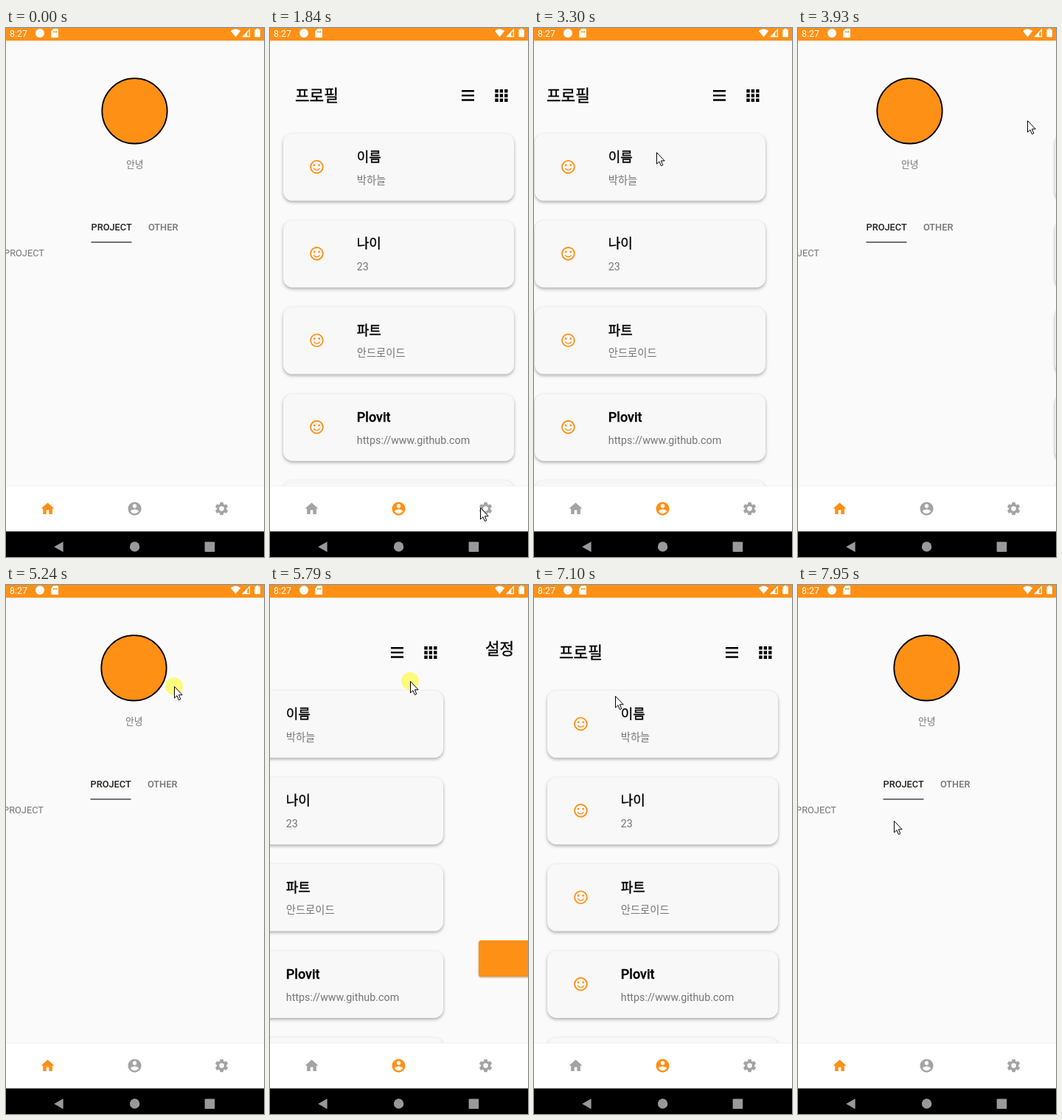
Recreate the animation shown at these times as an HTML page. Size 350 px wide and 716 px high, loop 8 s.

```html
<!DOCTYPE html>
<html lang="ko">
<head>
<meta charset="utf-8">
<style>
html, body { margin: 0; width: 100%; height: 100%; overflow: hidden; background: #fbfafa; }
svg { display: block; width: 350px; height: 716px; font-family: Roboto, "Noto Sans CJK KR", "Noto Sans CJK", sans-serif; }
.accent { fill: #ff9016; }
.soft { fill: #757575; }
.strong { font-weight: 500; stroke: #000; stroke-width: .35px; }
.head { font-size: 21.3px; }
.tab { font-size: 12.8px; font-weight: 500; }
.card { fill: #f8f8f8; filter: drop-shadow(0 2px 2.2px rgba(0,0,0,.32)); }
.button { filter: drop-shadow(0 1.5px 1.2px rgba(0,0,0,.3)); }
</style>
</head>
<body>
<svg viewBox="0 0 350 716">
  <rect width="350" height="716" fill="#fbfafa"/>

  <g class="page">
    <circle class="accent" cx="174.5" cy="112.3" r="44.2" stroke="#000" stroke-width="1.8"/>
    <text class="soft" x="174.8" y="189" font-size="12.8" text-anchor="middle">안녕</text>
    <text class="tab" x="115.5" y="274" fill="#212121">PROJECT</text>
    <text class="tab soft" x="193" y="274">OTHER</text>
    <rect x="115.5" y="289" width="55" height="1.8" fill="#62646c"/>
    <text class="soft" x="52" y="309.3" font-size="12.8" text-anchor="end">PROJECT</text>
  </g>

  <g class="page">
    <text class="strong head" x="34" y="99">프로필</text>
    <path d="M260 85.3h17M260 91.4h17M260 97.5h17" stroke="#000" stroke-width="2.4"/>
    <path d="M305.3 85.2h17.2M305.3 91.5h17.2M305.3 97.8h17.2" stroke="#000" stroke-width="4.4" stroke-dasharray="4.4 2"/>
    <g id="cards"></g>
  </g>

  <g class="page">
    <text class="strong head" x="34" y="94">설정</text>
    <rect class="accent button" x="25" y="481" width="299.5" height="49.3" rx="3.5"/>
    <text class="strong" x="174.7" y="511.8" font-size="16.1" fill="#fff" style="stroke:#fff" text-anchor="middle">로그아웃</text>
  </g>

  <rect class="accent" width="350" height="17.2"/>
  <g fill="#fff">
    <text x="5" y="11.6" font-size="12.4">8:27</text>
    <circle cx="46" cy="7" r="6"/>
    <path fill-rule="evenodd" d="M64.5 1H70q1 0 1 1V12q0 1-1 1H62.3q-1 0-1-1V4.5ZM64 4v2.6h1.2V4ZM66 4v2.6h1.2V4ZM68 4v2.6h1.2V4Z"/>
    <path d="M304.8 4Q311.5-1.4 318.2 4L311.5 12.2Z"/>
    <path fill-rule="evenodd" d="M331 .8V12.2H319.8ZM329.7 4L327.3 6.5V11H329.7Z"/>
    <path d="M339.6 .8h3v1.3h2.2V12.2h-7.4V2.1h2.2Z"/>
  </g>

  <rect y="619.5" width="350" height="1" fill="#efefef"/>
  <rect y="620.5" width="350" height="62" fill="#fff"/>
  <g id="nav" fill-rule="evenodd">
    <path d="M10 20v-6h4v6h5v-8h3L12 3 2 12h3v8z"/>
    <path d="M12 2a10 10 0 1 0 0 20 10 10 0 1 0 0-20zm0 3a3 3 0 1 1 0 6 3 3 0 1 1 0-6zm0 14.2c-2.5 0-4.71-1.28-6-3.22.03-1.99 4-3.08 6-3.08 1.99 0 5.97 1.09 6 3.08-1.29 1.94-3.5 3.22-6 3.22z"/>
    <path d="M19.14 12.94c.04-.3.06-.61.06-.94 0-.32-.02-.64-.07-.94l2.03-1.58c.18-.14.23-.41.12-.61l-1.92-3.32c-.12-.22-.37-.29-.59-.22l-2.39.96c-.5-.38-1.03-.7-1.62-.94l-.36-2.54c-.04-.24-.24-.41-.48-.41h-3.84c-.24 0-.43.17-.47.41l-.36 2.54c-.59.24-1.13.57-1.62.94l-2.39-.96c-.22-.08-.47 0-.59.22L2.74 8.87c-.12.21-.08.47.12.61l2.03 1.58c-.05.3-.09.63-.09.94s.02.64.07.94l-2.03 1.58c-.18.14-.23.41-.12.61l1.92 3.32c.12.22.37.29.59.22l2.39-.96c.5.38 1.03.7 1.62.94l.36 2.54c.05.24.24.41.48.41h3.84c.24 0 .44-.17.47-.41l.36-2.54c.59-.24 1.13-.56 1.62-.94l2.39.96c.22.08.47 0 .59-.22l1.92-3.32c.12-.22.07-.47-.12-.61zM12 15.6a3.6 3.6 0 1 1 0-7.2 3.6 3.6 0 1 1 0 7.2z"/>
  </g>
  <rect y="681.4" width="350" height="35"/>
  <g fill="#999">
    <path d="M65.2 702.2L77.6 695.2V709.2Z"/>
    <circle cx="174.6" cy="702" r="6.7"/>
    <rect x="269.6" y="695.4" width="13.6" height="13.6" rx="1"/>
  </g>

  <g id="cursor">
    <circle id="press" r="12" fill="#fffb3c" fill-opacity=".65"/>
    <path d="M.5 .5V16L4 12.8 6.4 18.6 8.8 17.6 6.4 11.8H11.2Z" fill="#fff" stroke="#000"/>
  </g>
</svg>
<script>
const LOOP = 8000, TICK = 77.2, PAGE = 354;
const HOLD = 200, DRAG = 227, SETTLE = 380;
const byId = id => document.getElementById(id);
const pages = document.querySelectorAll('.page');
const icons = [...byId('nav').children];

const entries = [['이름', '박하늘'], ['나이', '23'], ['파트', '안드로이드'], ['Plovit', 'https://www.github.com'], ['', '']];
byId('cards').innerHTML = entries.map(([title, value], i) => `
  <g transform="translate(0 ${143 + i * 117.4})">
    <rect class="card" x="18" width="313" height="90.8" rx="12.5"/>
    <g class="accent" transform="translate(52.3 33.8) scale(.93)">
      <circle cx="12" cy="12" r="9" fill="none" stroke="#ff9016" stroke-width="2"/>
      <circle cx="8.5" cy="9.5" r="1.5"/><circle cx="15.5" cy="9.5" r="1.5"/>
      <path d="M12 16c-1.48 0-2.75-.81-3.45-2H6.88c.8 2.05 2.79 3.5 5.12 3.5s4.32-1.45 5.12-3.5h-1.67c-.69 1.19-1.97 2-3.45 2z"/>
    </g>
    <text class="strong" x="117.8" y="38" font-size="18">${title}</text>
    <text class="soft" x="117.8" y="67.7" font-size="14.3">${value}</text>
  </g>`).join('');
icons.forEach((icon, i) => icon.setAttribute('transform', `translate(${45.6 + i * 118} 639.7) scale(.91)`));

// each gesture: time, press point, page it leads to
const tap = (at, x, y, page) => ({ at, x, y, page, drag: 0 });
const swipe = (at, x, y, page, dir) => ({ at, x, y, page, drag: dir * DRAG });
const gestures = [
  tap(1230, 170, 646, 1), tap(2160, 285, 649, 2),
  swipe(2854, 94, 249, 1, 1), swipe(3570, 84, 125, 0, 1),
  swipe(5247, 229, 137, 1, -1), swipe(5700, 290, 130, 2, -1),
  swipe(6163, 153, 109, 1, 1), swipe(7130, 110, 150, 0, 1)
];
const enter = { at: 510 - HOLD, x: 276, y: 700, drag: 0 };
const leave = { at: 7950, x: 130, y: 319, drag: 0 };

const clamp = v => Math.max(0, Math.min(1, v));
const mix = (a, b, p) => a + (b - a) * p;
const easeOut = p => 1 - (1 - clamp(p)) ** 3;
const smooth = p => clamp(p) ** 2 * (3 - 2 * clamp(p));

// a swipe follows the finger, then settles on its page; a tap settles at once
function scrollAt(t) {
  return gestures.reduce((pos, g, i) => {
    const age = Math.min(t, gestures[i + 1]?.at ?? LOOP) - g.at;
    if (age < 0) return pos;
    const dragged = pos - g.drag * clamp(age / HOLD);
    return mix(dragged, g.page * PAGE, easeOut((age - (g.drag ? HOLD : 50)) / SETTLE));
  }, 0);
}

// after a release the pointer rests briefly, then goes to the next press point
function pointerAt(t) {
  const stops = [enter, ...gestures, leave];
  const i = Math.max(0, stops.findLastIndex(s => s.at <= t));
  const from = stops[i], to = stops[i + 1] ?? from;
  const free = from.at + HOLD, gap = Math.max(1, to.at - free);
  const p = smooth(((t - free) / gap - .12) / .4);
  const x = from.x + from.drag * clamp((t - from.at) / HOLD);
  return [mix(x, to.x, p), mix(from.y, to.y, p)].map(Math.round);
}

function draw(now) {
  const time = now % LOOP;
  // the screen refreshes in even ticks
  const t = 2160 + Math.floor((time - 2145) / TICK) * TICK;
  const offset = scrollAt(t);
  pages.forEach((page, i) => page.setAttribute('transform', `translate(${Math.round(i * PAGE - offset)} 0)`));

  const done = gestures.filter(g => g.at + (g.drag ? HOLD : 70) <= t).pop();
  icons.forEach((icon, i) => icon.setAttribute('fill', i === (done?.page ?? 0) ? '#ff9016' : '#a3a3a3'));

  byId('cursor').setAttribute('transform', `translate(${pointerAt(t)})`);
  byId('cursor').style.display = time < 510 ? 'none' : '';
  byId('press').style.display = gestures.some(g => t >= g.at && t < g.at + HOLD) ? '' : 'none';
}

const start = performance.now();
function frame() {
  draw(performance.now() - start);
  requestAnimationFrame(frame);
}
frame();
</script>
</body>
</html>
```
